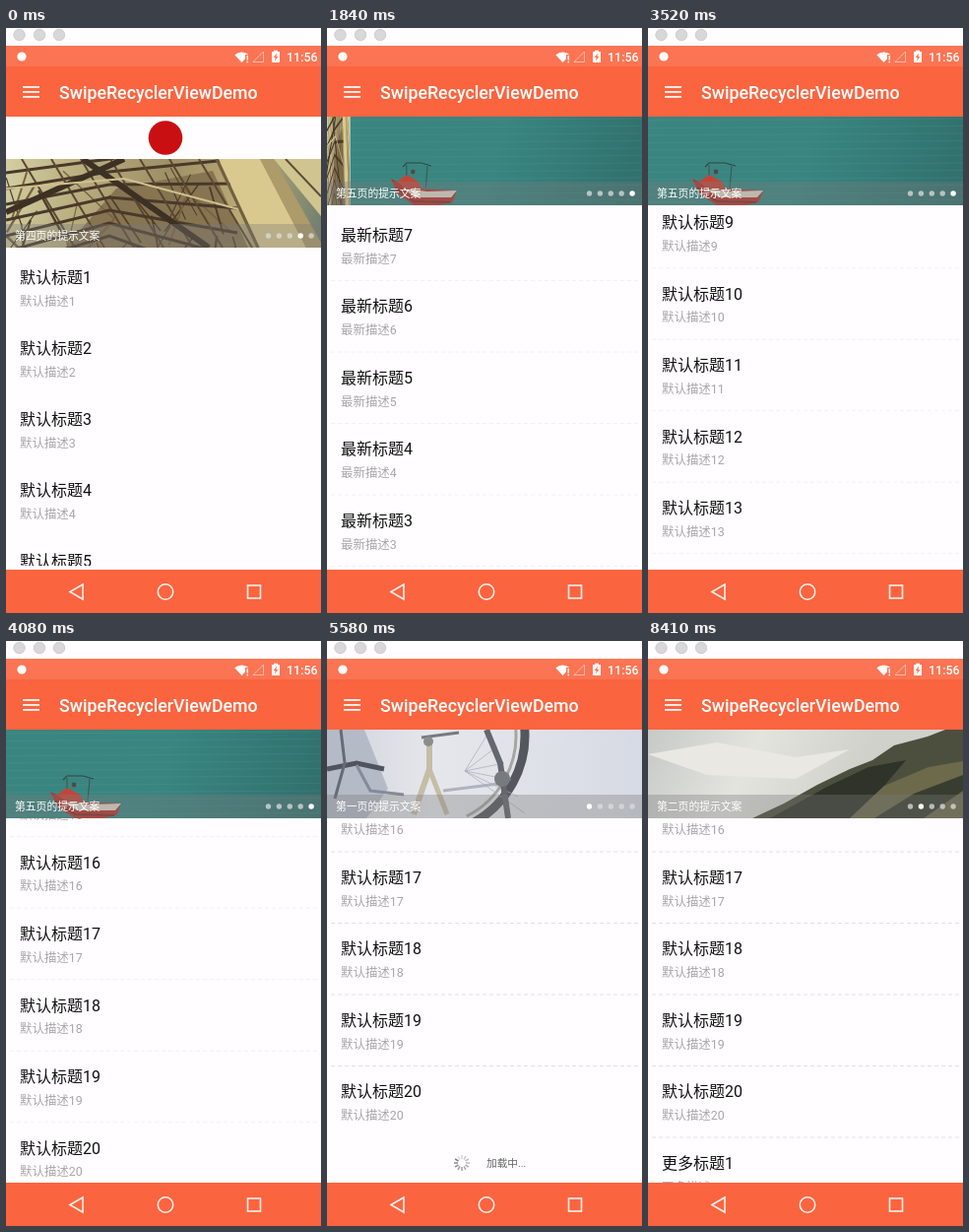
Animation of 320 by 594 pixels, one loop 8.46 s. Source, as an HTML page with a canvas:

```html
<!DOCTYPE html>
<html lang="zh-CN">
<head>
<meta charset="utf-8">
<style>
html, body { margin: 0; width: 100%; height: 100%; overflow: hidden; background: #fffdff; }
canvas { display: block; width: 320px; height: 594px; }
</style>
</head>
<body>
<canvas id="stage"></canvas>
<script>
const W = 320, H = 594, LOOP = 8460;
const ORANGE = '#fa643f', PAPER = '#fffdff';
const BANNER_H = 90, TOP = 90, BOTTOM = 550, PITCH = 72.5;
const REFRESHED = 1025, COLLAPSE = 1043, LOADED = 6300;
const SLIDES = [{ at: 1525, to: 4 }, { at: 4415, to: 0 }, { at: 7310, to: 1 }];
const PAGE_NAMES = ['一', '二', '三', '四', '五'];

// time, list offset, speed in px/ms
const SCROLL = [[1900, 0, 0], [2890, 399, .75], [4080, 1580, .3], [4500, 1637.5, 0]];

const canvas = document.getElementById('stage');
const ctx = canvas.getContext('2d');
const dpr = window.devicePixelRatio || 1;
canvas.width = W * dpr;
canvas.height = H * dpr;

const clamp = x => Math.max(0, Math.min(1, x));

// Fast start with a long exponential tail.
function viscous(t) {
  const x = clamp(t) * 8, start = Math.exp(-1);
  if (t >= 1) return 1;
  return x < 1 ? x - (1 - Math.exp(-x)) : start + (1 - start) * (1 - Math.exp(1 - x));
}

function scrollAt(t) {
  if (t <= SCROLL[0][0]) return 0;
  for (let i = 1; i < SCROLL.length; i++) {
    const [t0, y0, v0] = SCROLL[i - 1], [t1, y1, v1] = SCROLL[i];
    if (t > t1) continue;
    const d = t1 - t0, u = (t - t0) / d, w = 1 - u;
    return y0 * (1 + 2 * u) * w * w + d * v0 * u * w * w
         + y1 * u * u * (3 - 2 * u) - d * v1 * u * u * w;
  }
  return SCROLL[SCROLL.length - 1][1];
}

function rect(x, y, w, h, color) {
  ctx.fillStyle = color;
  ctx.fillRect(x, y, w, h);
}

function disc(x, y, r, color) {
  ctx.fillStyle = color;
  ctx.beginPath();
  ctx.arc(x, y, r, 0, Math.PI * 2);
  ctx.fill();
}

function path(points, close) {
  ctx.beginPath();
  for (let i = 0; i < points.length; i += 2) ctx.lineTo(points[i], points[i + 1]);
  if (close) ctx.closePath();
}

function poly(color, ...points) {
  path(points, true);
  ctx.fillStyle = color;
  ctx.fill();
}

function line(color, width, ...points) {
  path(points);
  ctx.strokeStyle = color;
  ctx.lineWidth = width;
  ctx.stroke();
}

function ring(x, y, r, width, color, from = 0, to = Math.PI * 2) {
  ctx.beginPath();
  ctx.arc(x, y, r, from, to);
  ctx.strokeStyle = color;
  ctx.lineWidth = width;
  ctx.stroke();
}

function text(str, x, middle, size, color, weight = 400) {
  ctx.font = `${weight} ${size}px Roboto, "Noto Sans CJK SC", "Noto Sans CJK", sans-serif`;
  ctx.fillStyle = color;
  ctx.fillText(str, x, middle + size * .37);
}

function shade(x0, y0, x1, y1, ...colors) {
  const g = ctx.createLinearGradient(x0, y0, x1, y1);
  colors.forEach((c, i) => g.addColorStop(i / (colors.length - 1), c));
  return g;
}

function clipped(x, y, w, h, draw) {
  ctx.save();
  ctx.beginPath();
  ctx.rect(x, y, w, h);
  ctx.clip();
  draw();
  ctx.restore();
}

function randomizer(seed) {
  return () => (seed = seed * 16807 % 2147483647) / 2147483647;
}

function bicyclePage() {
  rect(0, 0, W, 90, shade(0, 0, W, 0, '#cfd3dc', '#e6e7ec', '#dfe1e8', '#d6dae4'));
  poly('#b4bac6', 0, 0, 38, 0, 62, 60, 40, 90, 0, 90);
  line('#50545e', 5, 0, 40, 30, 34, 58, 40);
  line('#666b76', 3, 14, 0, 18, 34, 8, 70);
  line('#858b98', 3, 30, 36, 44, 62, 78, 66);
  line('#c5bda6', 6, 104, 10, 104, 40, 88, 86);
  line('#c5bda6', 5, 104, 40, 122, 86);
  line('#767a82', 3, 96, 8, 134, 3);
  disc(103, 12, 5, '#8c8c8c');
  line('#aeb3bd', 3, 118, 62, 182, 54);
  ring(100, 6, 101, 9, '#54575d', -.1, 1.1);
  ring(100, 6, 92, 3, '#a5a69f', -.1, 1.1);
  for (let i = 0; i < 6; i++) line('#a7abb4', .7, 140, 42, 166 + i * 7, i * 17);
  line('#64676d', 6, 162, 0, 176, 34, 184, 90);
  disc(178, 50, 8, '#777a7f');
}

function hillPage() {
  rect(0, 0, W, 90, shade(0, 0, 190, 90, '#c6c9c7', '#e4e4de', '#d0d1cb'));
  poly('#e9e8e2', 0, 25, 70, 13, 150, 28, 205, 20, 150, 50, 60, 46);
  poly('#4c4f3e', 106, 90, 138, 75, 172, 56, 205, 40, 228, 31, 250, 16, 284, 7, 302, 0, W, 0, W, 90);
  poly('#2f3329', 124, 90, 182, 58, 224, 38, 262, 31, 240, 57, 205, 90);
  poly('#6c6a4b', 205, 90, 240, 57, 285, 38, W, 32, W, 90);
  poly('#393d30', 230, 90, 270, 65, W, 46, W, 62, 280, 90);
}

function trussPage() {
  const rand = randomizer(37);
  rect(0, 0, W, 90, shade(0, 0, W, 60, '#d3cfa1', '#b7ac7e', '#9e9067', '#bba976', '#73816f'));
  poly('#877451', 60, 90, 112, 30, 210, 12, 246, 90);
  for (let i = 0; i < 30; i++) {
    const x = rand() * 235, y = rand() * 90, lean = (rand() - .5) * 110;
    line(i % 3 ? '#4d3d2b' : '#78633f', .8 + rand() * 1.8, x, y, x + lean, y + 48);
  }
  for (let i = 0; i < 7; i++) {
    line('#493929', 3, 0, 14 + i * 16, 105, i * 13, 235, i * 25 - 25);
    line('#5b4730', 2, 16 + i * 30, 0, 70 + i * 30, 90);
  }
  line('#3d3124', 6, 0, 54, 120, 0);
  line('#3d3124', 6, 78, 0, 206, 90);
  line('#d0c08b', 2, 0, 30, 120, 20, 240, 52);
  poly('#d9c98e', 216, 0, 258, 0, 305, 90, 258, 90);
  poly('#ad9b69', 258, 0, 272, 0, W, 85, W, 90, 305, 90);
  poly('#d1c58f', 272, 0, W, 0, W, 58);
  line('#70603f', 3, 214, 0, 256, 90);
  line('#59503a', 2, 284, 0, W, 38);
}

function boatPage() {
  rect(0, 0, W, 90, shade(0, 0, W, 90, '#3b8580', '#398580', '#306f6c'));
  for (let i = 0; i < 12; i++) line('rgba(130,180,170,.12)', 1, 0, 4 + i * 7.5, W, 2 + i * 7.5);
  poly('#b8322b', 45, 63, 66, 73, 117, 75, 112, 87, 98, 90, 70, 90, 52, 78);
  poly('#e3d9cc', 58, 73, 85, 76, 117, 75, 111, 82, 72, 82);
  line('#812b27', 2, 50, 72, 70, 86, 110, 87);
  line('#2f4745', 1.2, 58, 51, 62, 47, 78, 47, 89, 50);
  line('#41504c', 1, 62, 49, 62, 70);
  line('#41504c', 1, 85, 50, 83, 72);
  disc(69, 56, 2.4, '#504a41');
  poly('#c24637', 52, 66, 62, 59, 75, 66, 79, 74, 62, 74);
}

const PAGES = [bicyclePage, hillPage, () => rect(0, 0, W, 90, '#888'), trussPage, boatPage];

function page(index, x, width) {
  if (width <= 0) return;
  ctx.save();
  ctx.translate(x, 0);
  ctx.scale(width / W, 1);
  clipped(0, 0, W, BANNER_H, PAGES[index]);
  ctx.restore();
}

// The pages fold like an accordion between the two edges.
function banner(t, y) {
  let current = 3, previous = 3, progress = 1;
  for (const s of SLIDES) {
    if (t < s.at) break;
    previous = current;
    current = s.to;
    progress = viscous((t - s.at) / 800);
  }
  ctx.save();
  ctx.translate(0, y);
  const split = W * (1 - progress);
  page(previous, 0, split);
  page(current, split, W - split);
  rect(0, 66, W, 24, 'rgba(120,120,120,.35)');
  text(`第${PAGE_NAMES[current]}页的提示文案`, 9, 78, 10.8, '#fff');
  for (let i = 0; i < 5; i++) {
    disc(266.5 + i * 10.9, 78, 2.7, i === current ? '#fff' : 'rgba(220,220,220,.75)');
  }
  ctx.restore();
}

function rowLabel(i, fresh) {
  if (!fresh) return ['默认', i + 1];
  if (i < 7) return ['最新', 7 - i];
  return i < 27 ? ['默认', i - 6] : ['更多', i - 26];
}

function footer(t, y) {
  const step = Math.floor(t / 83);
  for (let i = 0; i < 12; i++) {
    const a = i * Math.PI / 6, c = Math.cos(a), s = Math.sin(a);
    const fade = ((step - i) % 12 + 12) % 12;
    const g = 130 + fade * 8;
    line(`rgb(${g},${g},${g})`, 1.5, 137 + c * 4, y + s * 4, 137 + c * 8, y + s * 8);
  }
  text('加载中...', 162, y, 10.67, '#666');
}

function list(t, top) {
  const fresh = t >= REFRESHED, pitch = fresh ? PITCH : 72;
  const first = top + 4 - scrollAt(t);
  const count = !fresh ? 20 : t < LOADED ? 27 : 28;
  for (let i = 0; i < count; i++) {
    const y = first + i * pitch;
    if (y > BOTTOM || y + pitch < top) continue;
    const [kind, n] = rowLabel(i, fresh);
    ctx.globalAlpha = i < 27 ? 1 : clamp((t - LOADED) / 120);
    if (fresh && i > 0) {
      ctx.setLineDash([4, 3]);
      line(t > 4400 ? '#e2e1e2' : '#f2f0f2', 1, 4, y, 316, y);
      ctx.setLineDash([]);
    }
    text(`${kind}标题${n}`, 14, y + 26, 16, '#111');
    text(`${kind}描述${n}`, 14, y + 50, 12.44, '#a8a6a8');
  }
  ctx.globalAlpha = 1;
  if (fresh && t < LOADED) footer(t, first + 27 * PITCH + 26);
}

function statusBar() {
  rect(0, 18, W, 21, '#fb7453');
  disc(16, 29, 4.6, '#fff');
  ctx.beginPath();
  ctx.moveTo(239.5, 35);
  ctx.arc(239.5, 35, 10.5, -Math.PI * .74, -Math.PI * .26);
  ctx.fillStyle = '#fff';
  ctx.fill();
  rect(243, 27, 4, 9, '#fb7453');
  rect(244.5, 28, 1.5, 4.5, '#fff');
  rect(244.5, 33.7, 1.5, 1.6, '#fff');
  line('rgba(255,255,255,.5)', 1, 251, 34.5, 261.5, 24, 261.5, 34.5, 251, 34.5);
  rect(270, 24, 8, 11, '#fff');
  rect(272, 22.7, 4, 2, '#fff');
  poly('#fb7453', 275, 25.5, 271.7, 30, 273.6, 30, 273, 33.5, 276.4, 29, 274.5, 29);
  text('11:56', 285, 29, 12.44, '#fff', 500);
}

function chrome() {
  rect(0, 0, W, 18, PAPER);
  for (const x of [13.5, 34, 54]) {
    disc(x, 7, 6, '#d9d8d9');
    ring(x, 7, 5.7, .7, '#c9c8c9');
  }
  statusBar();
  rect(0, 39, W, 51, ORANGE);
  for (const y of [60, 65, 70]) rect(17, y - .9, 17, 1.7, '#fff');
  text('SwipeRecyclerViewDemo', 54, 65.5, 17.78, '#fff', 500);

  rect(0, BOTTOM, W, H - BOTTOM, ORANGE);
  const ink = 'rgba(255,255,255,.9)';
  line(ink, 1.6, 65, 572.5, 78, 565, 78, 580, 65, 572.5, 78, 565);
  ring(162, 572.5, 7.7, 1.6, ink);
  ctx.strokeRect(245.5, 566, 13, 13);
}

function render(t) {
  ctx.setTransform(dpr, 0, 0, dpr, 0, 0);
  rect(0, 0, W, H, PAPER);
  const pull = 43 * (1 - viscous((t - COLLAPSE) / 400));
  const y = TOP + pull, listTop = y + BANNER_H;
  const listBottom = t < REFRESHED ? 546 : BOTTOM;
  clipped(0, listTop, W, listBottom - listTop, () => list(t, listTop));
  if (pull > 0) {
    clipped(0, TOP, W, pull, () => disc(162, y - 21.5, 17.3, t < REFRESHED ? '#c90f12' : '#a9a7a9'));
  }
  banner(t, y);
  chrome();
}

function tick() {
  render(performance.now() % LOOP);
  requestAnimationFrame(tick);
}
tick();
</script>
</body>
</html>
```
